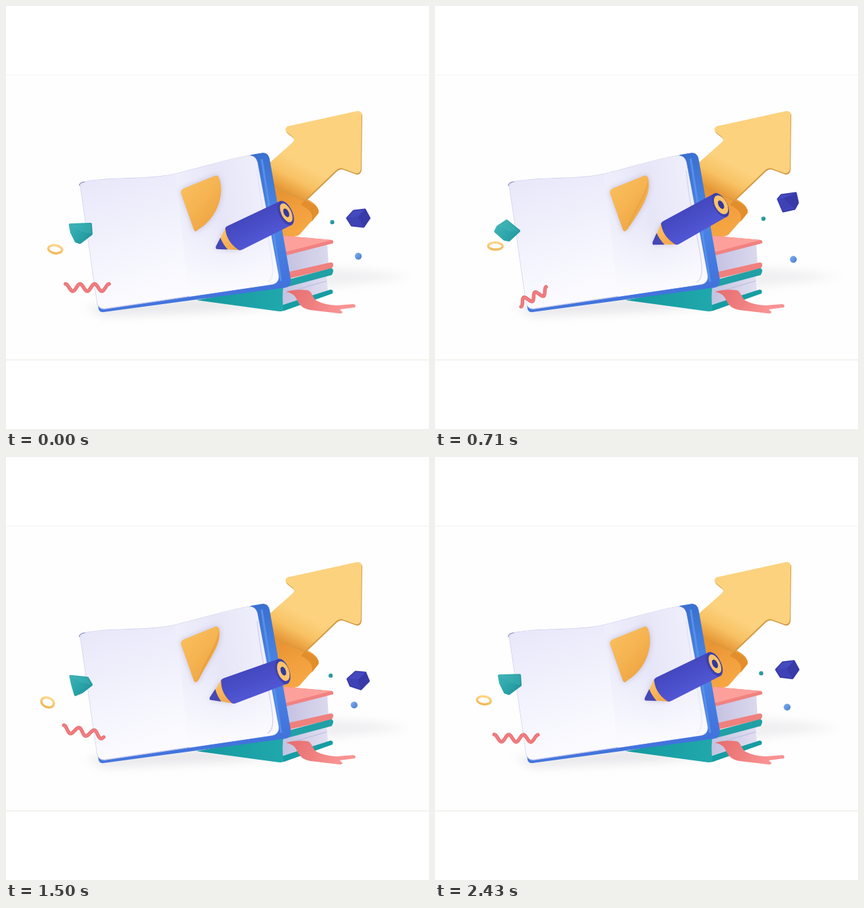
Write an HTML page with a canvas that moves like this. It is 640 px wide and 640 px high and loops after 2.5 s.

```html
<!DOCTYPE html>
<html lang="en">
<head>
<meta charset="utf-8">
<title>Open book with floating shapes</title>
<style>
html, body { margin: 0; width: 100%; height: 100%; overflow: hidden; background: #fff; }
canvas { display: block; }
</style>
</head>
<body>
<canvas id="stage" width="640" height="640"></canvas>
<script>
const ctx = document.getElementById('stage').getContext('2d');
const LOOP = 2500, STEPS = 35, CYCLE = 34.15;

function gradient(x0, y0, x1, y1, ...colors) {
  const g = ctx.createLinearGradient(x0, y0, x1, y1);
  colors.forEach((c, i) => g.addColorStop(i / (colors.length - 1), c));
  return g;
}

function shape(d, fill, stroke, width = 1) {
  const path = new Path2D(d);
  if (fill) { ctx.fillStyle = fill; ctx.fill(path); }
  if (stroke) { ctx.strokeStyle = stroke; ctx.lineWidth = width; ctx.stroke(path); }
}

function ellipse(x, y, rx, ry, fill) {
  ctx.beginPath();
  ctx.ellipse(x, y, rx, ry, 0, 0, 7);
  ctx.fillStyle = fill;
  ctx.fill();
}

function ball(x, y, r, light, dark) {
  ellipse(x, y, r, r, gradient(x - r, y - r, x + r, y + r, light, dark));
}

const polygon = points => 'M' + points.map(p => p.join(' ')).join('L') + 'Z';

function soft(blur, color, draw) {
  ctx.save();
  ctx.shadowColor = color;
  ctx.shadowBlur = blur;
  draw();
  ctx.restore();
}

// Smooth pose through left, middle and right key positions (s = -1, 0, 1).
const pose = (left, mid, right, s) => mid.map((p, i) => p.map((m, j) => {
  const a = left[i][j], b = right[i][j];
  return m + (b - a) / 2 * s + ((a + b) / 2 - m) * s * s;
}));

function drawFloor() {
  ctx.fillStyle = '#fff';
  ctx.fillRect(0, 0, 640, 640);
  ctx.fillStyle = '#fefefe';
  ctx.fillRect(0, 105, 640, 430);
  ctx.fillStyle = '#f4f3f1';
  ctx.fillRect(0, 104, 640, 1);
  ctx.fillStyle = '#ebe8df';
  ctx.fillRect(0, 535, 640, 1);
  ctx.save();
  ctx.filter = 'blur(7px)';
  shape('M120 456L300 440L420 454L330 462L150 470Z', '#d4d4da80');
  shape('M480 395L560 402L612 410L540 419L480 426Z', '#dedee270');
  ctx.restore();
}

function drawArrow() {
  shape('M390 255L455 292Q474 301 473 313L444 346Q438 351 415 350Z',
    gradient(415, 285, 446, 346, '#e89434', '#f2a03e', '#f6a743'));
  shape('M452 294Q475 302 473 313L462 327Q468 311 446 301Z', '#e28e2c');
  const head = 'M426 182L531 159Q539 158 538 166L537 246Q536 254 529 253L510 246Q505 244 500 248' +
    'L452 294L414 276L388 255L398 238L433 207Q438 203 434 198L424 190Q421 185 426 182Z';
  ctx.save();
  ctx.translate(1, 2);
  shape(head, '#d39b43');
  ctx.restore();
  shape(head, gradient(448, 238, 424, 283, '#fcd27f', '#f8c264', '#e69433'));
}

function drawStack() {
  shape('M415 374L486 358L488 392L420 410Z', gradient(428, 380, 488, 380, '#c5c3e2', '#dbd9ee'));
  shape('M398 350L425 348L493 354Q496 355 495 359L425 377L410 374Z', '#f18280');
  shape('M400 349L425 348L493 354L424 372Z', '#fda09b');
  shape('M420 404L491 388Q496 388 495 393L493 397L426 413Z', '#ef807d');
  shape('M415 426L485 404L487 432L418 452Z', gradient(420, 430, 488, 430, '#c3c3e2', '#e2e0f1'));
  shape('M424 434L485 416', null, '#b9b8da');
  shape('M415 417L491 397Q496 397 495 402L493 407L418 427Z', '#21a0a5');
  shape('M416 453L491 429Q496 429 494 435L421 461L414 462Z', '#159da3');
  shape('M288 445L420 421Q417 440 420 461L413 462Z', gradient(300, 445, 420, 445, '#159a9f', '#20a8ad'));
  shape('M424 432Q438 428 456 430C463 431 463 441 470 446Q482 452 500 453L526 451Q530 452 528 456' +
    'L505 459L509 463Q509 466 503 465L461 460C447 458 443 450 440 444Q436 435 424 432Z',
    gradient(430, 432, 500, 463, '#e76f70', '#ef7f7f', '#f99292'));
}

function drawBook(curl) {
  shape('M114 270L140 458Q141 464 148 463L423 426Q432 424 431 414L399 232' +
    'Q397 222 389 222L371 225L330 250L150 280Z',
    gradient(380, 225, 420, 425, '#3a70d0', '#4a86e5', '#4272dc'));
  shape('M387 232L416 416', null, '#5790ea', 3);
  const pages = 'M119 266C158 258 210 264 256 254C298 244 330 233 364 227Q377 225 380 236' +
    'L412 406Q414 418 403 421L152 458Q141 460 138 449L113 275Q112 268 119 266Z';
  shape(pages, '#dcdcf2', '#c4c7ea', 1.2);
  ctx.save();
  ctx.clip(new Path2D(pages));
  ctx.translate(-1, -1);
  shape(pages, gradient(180, 250, 245, 450, '#e8e8fa', '#f3f3fd', '#fcfcff'));
  const rightPage = 'M256 248L380 220L415 420L279 445Z';
  shape(rightPage, gradient(256, 330, 400, 310, '#f0f0fc', '#e7e6f8', '#f0effb'));
  shape(rightPage, gradient(330, 330, 340, 430, '#fbfbff00', '#fbfbff'));
  ctx.globalAlpha = .3 + .5 * curl;
  shape('M381 250C388 320 400 350 404 390Q407 413 397 419', null, '#c9c8e8', 1.5);
  ctx.restore();
  shape('M111 272Q111 267 119 266', null, '#7c86b8', 1.2);
}

function drawPetal(curl) {
  const mix = (a, b) => a + (b - a) * curl;
  const edge = `C${mix(331, 325)} ${mix(286, 285)} ${mix(319, 308)} ${mix(322, 299)} 291 338`;
  soft(9, '#77709a58', () => shape(`M265 284Q263 279 269 276L316 257Q321 255 323 262${edge}Q286 344 284 338Z`,
    gradient(270, 275, 315, 315, '#f9bd5b', '#f6b452', '#f0a845')));
  ctx.globalAlpha = curl * .7;
  shape('M322 264C324 285 308 299 291 338C298 308 316 292 322 264Z', '#e59b37');
  ctx.globalAlpha = 1;
}

function drawGem(s) {
  const p = pose(
    [[98, 333], [115, 337], [129, 343], [117, 353], [104, 362], [100, 346]],
    [[97, 331], [128, 330], [129, 345], [112, 358], [106, 356], [99, 342]],
    [[95, 334], [107, 325], [127, 340], [112, 354], [105, 353], [91, 341]], s);
  const fill = gradient(95, 330, 130, 355, '#3fb3b7', '#2ba5aa', '#20929a');
  ctx.lineJoin = 'round';
  shape(polygon(p), fill, fill, 4);
  shape(polygon([p[0], p[1], p[2], [113, 341]]), '#4ab7b855');
}

function drawCube(s) {
  const p = pose(
    [[518, 342], [531, 332], [545, 336], [548, 349], [534, 360], [520, 353], [532, 346]],
    [[516, 321], [526, 310], [543, 308], [550, 321], [541, 334], [523, 332], [532, 319]],
    [[519, 291], [524, 285], [546, 282], [549, 297], [544, 306], [527, 310], [527, 290]], s);
  ctx.lineJoin = 'round';
  shape(polygon(p.slice(0, 6)), '#373aa8', '#373aa8', 3);
  shape(polygon([p[0], p[1], p[2], p[6]]), '#4549be');
  shape(polygon([p[0], p[6], p[4], p[5]]), '#3f42b5');
}

function drawRing(s, twist) {
  ctx.save();
  ctx.translate(74.5 + 17.5 * s, 368 - 5 * s);
  ctx.rotate((8 + 14 * twist) * Math.PI / 180);
  ctx.beginPath();
  ctx.ellipse(0, 0, 10.5 - .7 * twist, 6 + 1.2 * twist, 0, 0, 7);
  ctx.lineWidth = 3.5;
  ctx.strokeStyle = gradient(0, -8, 0, 8, '#ffd98e', '#f0b555');
  ctx.stroke();
  ctx.restore();
}

function drawSquiggle(s) {
  const [[x0, y0], [x1, y1]] = pose(
    [[92, 404], [145, 418]], [[90, 426], [156, 426]], [[130, 451], [171, 430]], s);
  const length = Math.hypot(x1 - x0, y1 - y0);
  const nx = (y1 - y0) / length, ny = (x0 - x1) / length;
  const turn = Math.max(s, 0);
  ctx.beginPath();
  for (let u = 0; u <= 1.001; u += .02) {
    const wave = 5.5 * Math.cos(Math.PI * (u * (6 - Math.abs(s)) + turn));
    ctx.lineTo(x0 + (x1 - x0) * u + nx * wave, y0 + (y1 - y0) * u + ny * wave);
  }
  ctx.lineCap = ctx.lineJoin = 'round';
  for (const [color, width] of [['#dd686d', 5.4], ['#f17b7e', 4]]) {
    ctx.strokeStyle = color;
    ctx.lineWidth = width;
    ctx.stroke();
  }
}

function drawPencil(s, twist) {
  ctx.save();
  ctx.translate(371 + 10.7 * s, 341 - 10.5 * s - 1.5 * twist);
  ctx.rotate((6 * twist - 26) * Math.PI / 180);
  soft(8, '#6f6aa550', () => shape('M-59 0L-33 -22L-28 18Z', gradient(0, -20, 0, 18, '#fdc266', '#f2a348')));
  shape('M-59 1Q-60 -1 -58 -3L-46 -12Q-47 -2 -44 9Z', '#4548b5');
  shape('M-34 -19Q-34 -23 -28 -23L58 -22L60 18L-24 19Q-29 19 -30 16Q-40 -2 -34 -19Z',
    gradient(0, -22, 0, 19, '#4448bf', '#4a4fc9', '#5157d4'));
  ellipse(59, -2, 10, 20, '#3e40ab');
  ellipse(60, -2, 7.5 + 1.5 * Math.abs(s), 15.5, '#fbc36a');
  ellipse(60, -2, 3.8, 7, '#34389c');
  ctx.restore();
}

function draw(now) {
  const ticks = Math.floor(now % LOOP / 10) + .5;
  const step = Math.floor(ticks * STEPS * 10 / LOOP);
  const phase = 2 * Math.PI * step / CYCLE;
  const s = Math.sin(phase), twist = Math.sin(2 * phase), curl = (1 - Math.cos(phase)) / 2;
  drawFloor();
  drawArrow();
  drawStack();
  drawBook(curl);
  drawPetal(curl);
  drawGem(s);
  drawRing(s, twist);
  drawSquiggle(s);
  drawPencil(s, twist);
  drawCube(s);
  ball(493.5 + 3.5 * s, 327 - 5.5 * s, 3.2, '#3fb0b2', '#1c858e');
  ball(533 + 9.5 * s, 378.5 + 5 * s, 5.2, '#80b2f4', '#477bd0');
  requestAnimationFrame(draw);
}
requestAnimationFrame(draw);
</script>
</body>
</html>
```
